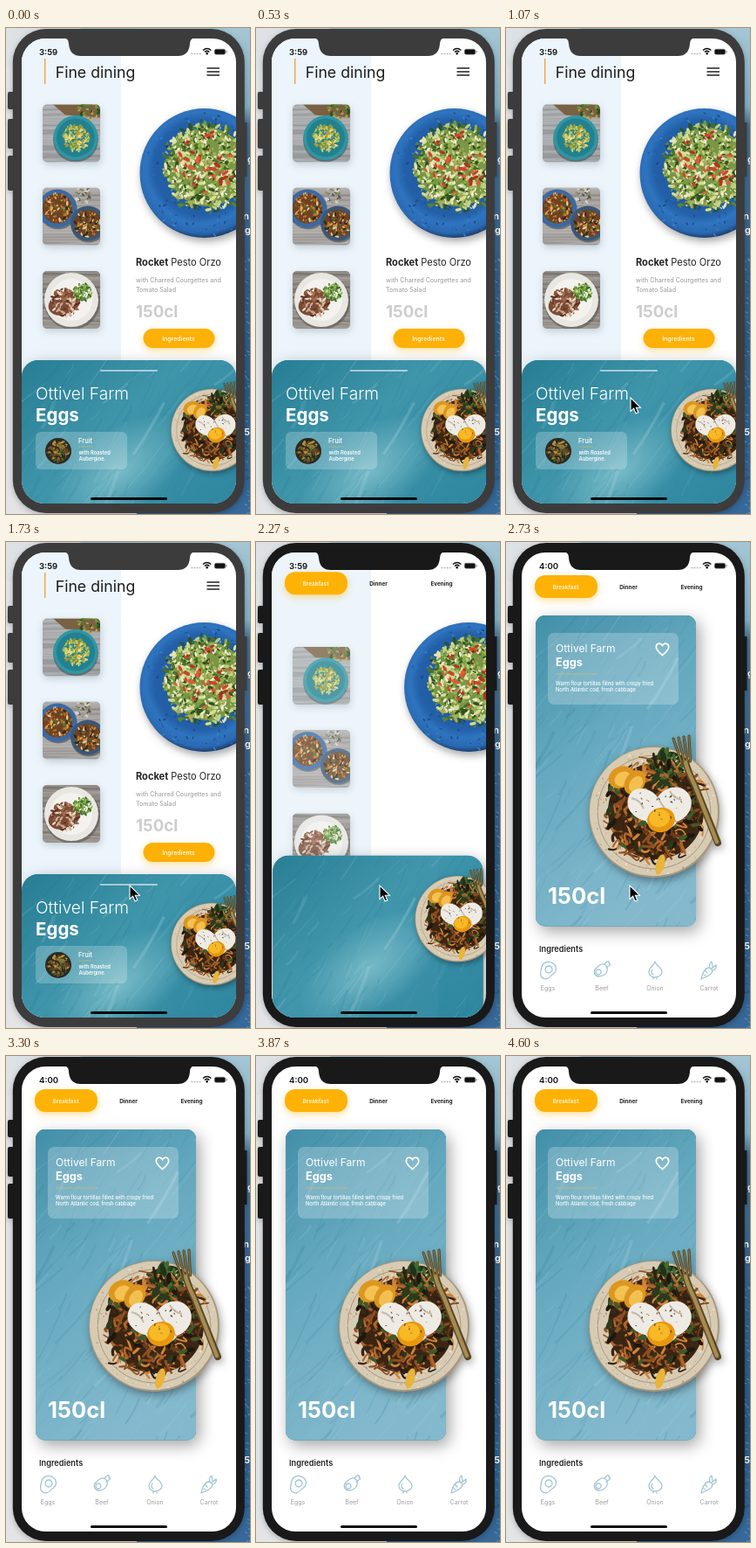
An HTML page that plays this animation: 280x556 px, repeating every 4.63 s.

```html
<!DOCTYPE html>
<html lang="en">
<head>
<meta charset="utf-8">
<title>Recipe app</title>
<style>
html, body { margin: 0; width: 100%; height: 100%; overflow: hidden; background: #e2e4e6; }
svg { display: block; width: 280px; height: 556px; }
text { font-family: Inter, Roboto, sans-serif; }
.b { font-weight: 700; }
.m { font-weight: 600; }
.w { fill: #fff; }
.mid { text-anchor: middle; }
.soft { filter: drop-shadow(1px 3px 4px rgba(20, 40, 60, .2)); }
.deep { filter: drop-shadow(2px 4px 5px rgba(0, 0, 0, .36)); }
.glow { filter: drop-shadow(0 3px 4px rgba(253, 176, 5, .4)); }
.line { fill: none; stroke: #a3c6d5; stroke-width: 1.3; stroke-linecap: round; stroke-linejoin: round; }
</style>
</head>
<body>
<svg viewBox="0 0 280 556">
  <defs>
    <linearGradient id="side" x2="0" y2="1">
      <stop offset="0" stop-color="#a5c6d4"/><stop offset=".16" stop-color="#83b0c4"/>
      <stop offset=".2" stop-color="#47708f"/><stop offset=".48" stop-color="#346089"/>
      <stop offset=".75" stop-color="#2b5c88"/><stop offset="1" stop-color="#37699a"/>
    </linearGradient>
    <linearGradient id="top"><stop offset="0" stop-color="#dfe2e4"/><stop offset=".3" stop-color="#d5dcdf"/>
      <stop offset=".31" stop-color="#9fc3d2"/><stop offset="1" stop-color="#a5c6d4"/></linearGradient>
    <linearGradient id="teal" x2="1" y2=".8">
      <stop offset="0" stop-color="#277d93"/><stop offset=".45" stop-color="#3f95aa"/><stop offset="1" stop-color="#2f87a0"/>
    </linearGradient>
    <radialGradient id="haze"><stop offset="0" stop-color="#8cc8d2" stop-opacity=".75"/><stop offset="1" stop-color="#8cc8d2" stop-opacity="0"/></radialGradient>
    <linearGradient id="pale" x2=".4" y2="1">
      <stop offset="0" stop-color="#438fa9"/><stop offset=".45" stop-color="#65a9bf"/><stop offset="1" stop-color="#84b9cd"/>
    </linearGradient>
    <radialGradient id="rim" cx=".48" cy=".46" r=".54">
      <stop offset="0" stop-color="#1f549a"/><stop offset=".68" stop-color="#2360a8"/>
      <stop offset=".8" stop-color="#2f74bf"/><stop offset=".93" stop-color="#2a69b2"/><stop offset="1" stop-color="#1c3f70"/>
    </radialGradient>
    <clipPath id="screen"><rect x="18" y="12" width="246" height="532" rx="27"/></clipPath>
    <clipPath id="cardClip"><rect class="cardBox"/></clipPath>
    <clipPath id="thumbClip"><rect width="66" height="66" rx="5"/></clipPath>
  </defs>

  <rect width="280" height="556" fill="#e2e4e6"/>
  <rect width="280" height="45" fill="url(#top)"/>
  <rect x="150" width="130" height="556" fill="url(#side)"/>
  <g id="sea"></g>
  <g class="w m" font-size="11" text-anchor="end">
    <text x="284" y="154">g</text><text x="279" y="219">n</text>
    <text x="281" y="235">ng</text><text x="280" y="466">5</text>
  </g>

  <g id="body" style="filter:drop-shadow(0 2px 3px rgba(0,0,0,.25))">
    <path d="M9 73H4q-2 0-2 2v16q0 2 2 2h5zM9 104H4q-2 0-2 2v30q0 2 2 2h5zM9 146H4q-2 0-2 2v36q0 2 2 2h5zM272 108h4.500v62h-4.500z"/>
    <rect x="7.800" y="1" width="266" height="554" rx="38"/>
  </g>

  <g clip-path="url(#screen)">
    <rect x="18" y="12" width="246" height="532" fill="#fff"/>
    <rect id="strip" x="18" y="12" width="114" height="532" fill="#ecf5fb"/>

    <g id="list"></g>
    <g id="pesto" class="deep"></g>

    <g class="home">
      <path d="M44.700 35v29" stroke="#f0a848" stroke-width="1.500"/>
      <text x="56.700" y="57" font-size="17.700" fill="#1c1c1e">Fine dining</text>
      <path d="M230.500 46h14.500m-14.500 4h14.500m-14.500 4h14.500" stroke="#222" stroke-width="1.600"/>
      <text x="149" y="272" font-size="11.050" fill="#222"><tspan class="b">Rocket</tspan> Pesto Orzo</text>
      <g font-size="7.100" font-weight="500" fill="#a4a4a6">
        <text x="149" y="291">with Charred Courgettes and</text>
        <text x="149" y="301.500">Tomato Salad</text>
      </g>
      <text class="b" x="149" y="331" font-size="18.700" fill="#cdcdcf">150cl</text>
      <rect class="glow" x="157.500" y="344" width="82" height="22" rx="11" fill="#fdb005"/>
      <text class="w mid" x="198" y="357.500" font-size="7" font-weight="500">Ingredients</text>
    </g>

    <g id="tabs" class="b mid" font-size="6.400" fill="#222">
      <rect class="glow" x="33" y="38" width="72" height="26" rx="12" fill="#fdb205"/>
      <text x="68.500" y="53.500" fill="#fff0c4">Breakfast</text>
      <text x="140.500" y="53.500">Dinner</text>
      <text x="213" y="53.500">Evening</text>
    </g>

    <g id="needs">
      <text class="m" x="38" y="469" font-size="9.200" fill="#222">Ingredients</text>
      <g class="line">
        <path d="M41 486c2-6 9-7 13-4s4 6 3 9-4 3-6 6-7 4-10 1-1-7 0-12zM49 485a4 4 0 1 0 .1 0z"/>
        <path d="M106 497c-5-1-6-6-3-9s7-7 11-4 2 9-1 11-4 2-7 2zM113 483l3-3c2-1 3 1 2 2 2 0 2 2 0 3l-3 2M106 489a3 3 0 1 0 .1 0z"/>
        <path d="M171 480c0 4-7 6-7 12 0 4 4 6 7 6s8-2 8-6c0-6-8-8-8-12zM169 498v2m4-2v2M168 489c-2 3-1 5 1 6"/>
        <path d="M224 500c1-6 4-12 8-13 4 0 6 4 4 6-2 3-7 5-12 7zM234 487c-1-4 0-6 2-7l1 6M236 488l5-4c1 3-1 5-4 6M229 491l2 2m-4 2l2 1"/>
      </g>
      <g class="mid" font-size="7" fill="#9c9c9f">
        <text x="48" y="513">Eggs</text><text x="110" y="513">Beef</text>
        <text x="171" y="513">Onion</text><text x="233" y="513">Carrot</text>
      </g>
    </g>

    <rect class="cardBox" fill="#4b9ab1" style="filter:drop-shadow(4px 6px 9px rgba(0,0,0,.36))"/>
    <g clip-path="url(#cardClip)"><g id="paint"></g></g>

    <g class="home w">
      <path d="M109 392h64" stroke="#fff" stroke-opacity=".55" stroke-width="2.200" stroke-linecap="round"/>
      <text x="34" y="425" font-size="19.200" font-weight="350">Ottivel Farm</text>
      <text class="b" x="34" y="450" font-size="20.500">Eggs</text>
      <rect x="34" y="462" width="105" height="43" rx="6" fill-opacity=".22"/>
      <g id="bowl"></g>
      <text x="83" y="475" font-size="7.500" font-weight="500">Fruit</text>
      <path d="M84 479h16" stroke="#e9bd4c" stroke-dasharray="1 1.200"/>
      <g class="m" font-size="5.800"><text x="83.500" y="488">with Roasted</text><text x="83.500" y="494.500">Aubergine.</text></g>
    </g>

    <g id="info" class="w">
      <rect x="48" y="104" width="150" height="82" rx="7" fill-opacity=".23"/>
      <text x="57" y="126" font-size="12">Ottivel Farm</text>
      <text class="b" x="57" y="142" font-size="12.700">Eggs</text>
      <path d="M58 151h47" stroke="#f0c245" stroke-width="1.200" stroke-dasharray="1.200 1.200"/>
      <path d="M179.500 129.500c-4-3.500-7.200-6-7.200-9.300 0-4.600 5.200-5.400 7.200-1.700 2-3.700 7.200-2.900 7.200 1.700 0 3.300-3.200 5.800-7.200 9.300z"
        fill="none" stroke="#fff" stroke-width="1.700"/>
      <g font-size="5.700" font-weight="500">
        <text x="57" y="164">Warm flour tortillas filled with crispy fried</text>
        <text x="57" y="171">North Atlantic cod, fresh cabbage</text>
      </g>
      <text class="b" x="48" y="414" font-size="25.600">150cl</text>
    </g>

    <g id="eggs" class="deep"></g>

    <text id="clock" class="m" x="38" y="30.500" font-size="9.600" fill="#111"></text>
    <path d="M212.500 29.500h11" stroke="#b4b4b6" stroke-width="1.600" stroke-dasharray="1.800 1.300"/>
    <path d="M226 25.500q4.700-4 9.400 0M228 27.500q2.700-2.300 5.400 0" fill="none" stroke="#111" stroke-width="1.500"/>
    <circle cx="230.700" cy="29.300" r="1.200"/>
    <rect x="239.300" y="24.200" width="12.400" height="6" rx="1.800" fill="#111" stroke="#777" stroke-width=".6"/>
    <path d="M253 26v2.500" stroke="#777"/>
    <path d="M98.500 538.600h85" stroke="#0a0a0a" stroke-width="3" stroke-linecap="round"/>
  </g>
  <path id="notch" d="M66 11H217Q211 12 211 18Q210 32 197 32H86Q73 32 72 18Q72 12 66 11Z"/>
  <path id="mouse" d="M0 0v15.500l3.600-3.300 2.500 5.800 2.700-1.200-2.500-5.600h5z" fill="#000" stroke="#fff" stroke-width="1.100"/>
</svg>
<script>
const LOOP = 4630, OPEN = 2188, OPEN_TIME = 437, FOCUS = 2100, MINUTE = 2600;
const $ = id => document.getElementById(id);
const all = sel => [...document.querySelectorAll(sel)];

let seed = 11;
const rnd = () => {
  seed = (seed * 16807) % 2147483647;
  return seed / 2147483647;
};
const pick = list => list[Math.floor(rnd() * list.length)];
const repeat = (n, fn) => Array.from({ length: n }, fn).join('');
const disc = (x, y, r, fill, more = '') => `<circle cx="${x}" cy="${y}" r="${r}" fill="${fill}" ${more}/>`;
const spot = (x, y, rx, ry, turn, fill) =>
  `<ellipse rx="${rx}" ry="${ry}" fill="${fill}" transform="translate(${x} ${y}) rotate(${turn})"/>`;

// Scatter small pieces over a disc
const scatter = (x, y, r, n, size, colors) => repeat(n, () => {
  const a = rnd() * 6.283, d = r * Math.sqrt(rnd()), s = size * (.5 + rnd());
  return spot(x + d * Math.cos(a), y + d * Math.sin(a), s, s * .45, rnd() * 180, pick(colors));
});

const noodles = (r, n, colors) => repeat(n, () => {
  const a = rnd() * 6.283, d = r * Math.sqrt(rnd());
  const bend = () => (rnd() - .5) * 26;
  return `<path d="M${d * Math.cos(a)} ${d * Math.sin(a)}q${bend()} ${bend()} ${bend()} ${bend()}"
    fill="none" stroke="${pick(colors)}" stroke-width="${1.5 + rnd() * 2}" stroke-linecap="round"/>`;
});

$('sea').innerHTML = repeat(70, () =>
  `<path d="M${273 + rnd() * 6} ${260 + rnd() * 296}l3 1.500" stroke="${pick(['#6f9cc0', '#1c4670', '#8fb4d0'])}" stroke-opacity=".6"/>`);

const GREEN = ['#b9cd78', '#8fb04a', '#d9dd9a', '#48702a', '#e6e2b4', '#6f9a3c', '#c9d488', '#2f4f20', '#a8ad58'];
const ROAST = ['#c5712c', '#6d4222', '#e0a04a', '#33261a', '#e0cfa4', '#566b2c', '#8f5426'];

$('pesto').innerHTML =
  disc(227.5, 166, 74, 'url(#rim)') +
  scatter(227.5, 166, 72, 200, 1.5, ['#1b4a84', '#3b80c6', '#225a9f', '#2a6cb4']) +
  scatter(231, 159, 54, 130, 3, ['#2c5128', '#1f3f63', '#5d8236']) +
  disc(231, 159, 45, '#7c9646') +
  scatter(231, 159, 50, 620, 2.9, GREEN) +
  scatter(230, 153, 36, 45, 3.3, ['#d6402a', '#e2593a', '#b92f1f']) +
  scatter(231, 159, 44, 110, 2, ['#f4f0dc', '#2d5420']);

const wood = (base, tones) => `<rect width="66" height="66" fill="${base}"/>` + repeat(24, (_, i) =>
  `<path d="M0 ${i * 3}l66 ${rnd() * 8 - 4}" stroke="${pick(tones)}" stroke-opacity=".4" stroke-width="${.6 + rnd() * 2}"/>`);
const dish = (x, y, r, color, fill, food) =>
  disc(x + 1, y + 2, r, '#222a30', 'opacity=".45"') + disc(x, y, r, color) +
  disc(x, y, r * .78, fill) + scatter(x, y, r * .76, 110, 1.9, food);

const thumbs = [
  wood('#a5a7a8', ['#7d8284', '#c4c5c5']) + '<path d="M12 0h54v15l-40-3z" fill="#7a6142"/>' +
    scatter(54, 5, 12, 45, 2.4, ['#4e7a32', '#6f9a3c', '#2f4f22', '#c9a04a']) +
    disc(38, 40, 26, '#27414a', 'opacity=".5"') + disc(38, 38, 25.5, '#2f96a4') + disc(38, 38, 22, '#23818f') +
    scatter(38, 38, 15, 170, 2, ['#d9cf68', '#b8c25a', '#e9dc90', '#7f9a3c', '#b59a3a']),
  wood('#a9a6a3', ['#7f7b78', '#c9c6c3']) + dish(17, 24, 22, '#3a69a4', '#6d4222', ROAST) +
    dish(52, 41, 20, '#3c5775', '#6d4222', ROAST) + scatter(46, 8, 10, 30, 2, ['#d8d3c8', '#7d8a58', '#5d5148']),
  wood('#8f8a84', ['#5d5751', '#b8b3ac']) + disc(34, 35, 32, '#46423e', 'opacity=".45"') + disc(33, 33, 31, '#e9e7e2') +
    disc(33, 33, 24, '#f4f2ee') + spot(25, 37, 19, 13, -22, '#7a4a36') +
    scatter(26, 36, 16, 120, 2.1, ['#a26a4a', '#5c3122', '#d0b096', '#8a553a', '#e6d8c4']) +
    scatter(46, 24, 10, 80, 2, ['#6c9a3a', '#8db552', '#44702a'])
];
$('list').innerHTML = thumbs.map((art, i) =>
  `<g class="soft" transform="translate(42 ${[87.5, 182.5, 278][i]})"><g clip-path="url(#thumbClip)">${art}</g></g>`).join('');

$('bowl').innerHTML = disc(60, 484, 15, '#2b2a22') + scatter(60, 484, 12, 90, 2, ['#8a7a3a', '#b8923c', '#4e5a28', '#6b4020']);

// Egg plate, centred on 0,0 with radius 75
const tines = [22, 28, 34, 40].map((x, i) => `M${x} ${-84 - i}L${31 + i * 3.5} -58`).join('');
$('eggs').innerHTML =
  disc(0, 0, 75, '#a8977a') + disc(-.5, -.5, 73.5, '#d8cbb3') +
  scatter(0, 0, 72, 300, 1.2, ['#c3b190', '#a08863', '#efe7d8']) +
  disc(0, 0, 65, 'none', 'stroke="#a9987a" stroke-width="1"') +
  disc(2, -1, 55, '#3b2614') +
  scatter(14, -50, 20, 55, 6, ['#2f4a24', '#456a30', '#20331a']) +
  noodles(57, 210, ['#b0662a', '#d0843a', '#6b3b1a', '#2c2012', '#8f4f20', '#3a2512']) +
  scatter(0, 0, 58, 90, 4.5, ['#2b3a1c', '#3f5a2a', '#8a4b20', '#1f1810']) +
  spot(-38, -40, 15, 12, -30, '#dd971f') + spot(-36, -38, 10, 8, -30, '#f3c252') +
  spot(-22, -34, 11, 15, 35, '#dc961f') + spot(-21, -32, 7, 10, 35, '#f2bf50') +
  spot(7, 60, 5, 12, 15, '#e9b43a') +
  '<path d="M-29-18C-24-30-6-30 4-17C12-30 32-33 40-20C48-8 38 8 26 11C20 24-2 22-10 10C-26 6-34-6-29-18z" fill="#eeebe5"/>' +
  '<path d="M4-18C8-8 14-2 26 12M-26-16q10 2 14 12M18-24q4 8 14 10" fill="none" stroke="#c2b9ab" stroke-width="2"/>' +
  spot(8, 9, 16, 14, -15, '#e8980f') + spot(6, 7, 12, 10, -15, '#f8b927') +
  scatter(6, -4, 32, 40, 1.1, ['#6b4a2a', '#3b2a18', '#b0722e']) +
  `<g fill="none" stroke-linecap="round"><path d="${tines}" stroke="#4a3a1c" stroke-width="3"/>
   <path d="M36-58Q38-48 46-32L73 35" stroke="#5a4722" stroke-width="8"/>
   <path d="M36-57Q38-48 46-32L72 34" stroke="#a58c52" stroke-width="4.500"/>
   <path d="${tines}" stroke="#8d7540" stroke-width="1.500"/></g>`;

const strokes = (n, tones) => repeat(n, () => {
  const x = rnd() * 290, y = rnd() * 380 - 20, len = 12 + rnd() * 60, a = 2.2 + (rnd() - .5) * .6;
  const dx = len * Math.cos(a), dy = len * Math.sin(a);
  return `<path d="M${x} ${y}q${dx * .5 + 3} ${dy * .5} ${dx} ${dy}" fill="none" stroke="${pick(tones)}"
    stroke-opacity="${.06 + rnd() * .16}" stroke-width="${.4 + rnd() * rnd() * 4}"/>`;
});
$('paint').innerHTML =
  '<rect width="250" height="186" fill="url(#teal)"/><rect y="185" width="250" height="180" fill="#3d92aa"/>' +
  '<ellipse rx="95" ry="48" fill="url(#haze)" transform="translate(112 128) rotate(-35)"/>' +
  '<rect id="bright" width="190" height="360" fill="url(#pale)"/>' +
  strokes(330, ['#bfe0ea', '#8cc6d6', '#1d6c88', '#2a7b96']);

const mix = (a, b, p) => a + (b - a) * p;
const clamp = v => Math.max(0, Math.min(1, v));
const ease = u => u < .5 ? 2 * u * u : 1 - 2 * (1 - u) ** 2;
const show = (el, on) => { el.style.display = on ? '' : 'none'; };

// time, x, y
const PATH = [[650, 290, 500], [1000, 143, 423], [1200, 143, 423], [1550, 142, 393], [2950, 142, 393], [3150, 290, 470]];
function mouseAt(t) {
  const i = PATH.findIndex(k => k[0] > t);
  if (i < 1) return PATH[PATH.length - 1].slice(1);
  const [a, b] = [PATH[i - 1], PATH[i]], p = ease((t - a[0]) / (b[0] - a[0]));
  return [mix(a[1], b[1], p), mix(a[2], b[2], p)];
}

const home = all('.home'), boxes = all('.cardBox');
function draw(t) {
  const open = t >= OPEN, p = ease(clamp((t - OPEN) / OPEN_TIME)), late = clamp((p - .6) / .4);
  const move = (id, x, y, s = 1) => $(id).setAttribute('transform', `translate(${x} ${y}) scale(${s})`);

  const tone = t < FOCUS ? '#3c3c3d' : '#19191a';
  $('body').setAttribute('fill', tone);
  $('notch').setAttribute('fill', tone);
  $('clock').textContent = t < MINUTE ? '3:59' : '4:00';

  home.forEach(el => show(el, !open));
  show($('tabs'), open);
  show($('list'), p < 1);
  show($('pesto'), p < 1);
  $('strip').style.opacity = 1 - p;
  $('list').style.opacity = clamp(1 - 3 * p);
  move('tabs', 0, -4 * (1 - p));
  move('list', 0, 450 * p);
  move('pesto', 230 * p, 0);

  const x = mix(18, 34, p), y = mix(380, 84, p);
  const box = { x, y, width: mix(264, 218, p) - x, height: mix(553, 439.5, p) - y, rx: mix(19, 11, p) };
  boxes.forEach(el => Object.entries(box).forEach(([k, v]) => el.setAttribute(k, v)));
  move('paint', x, y);
  $('bright').style.opacity = p;
  move('eggs', mix(236.5, 170, p), mix(460, 309, p ** .63), mix(.63, 1, p));
  $('info').style.opacity = $('needs').style.opacity = late;

  move('mouse', ...mouseAt(t));
}

const start = performance.now();
function tick() {
  draw((performance.now() - start) % LOOP);
  requestAnimationFrame(tick);
}
tick();
</script>
</body>
</html>
```
